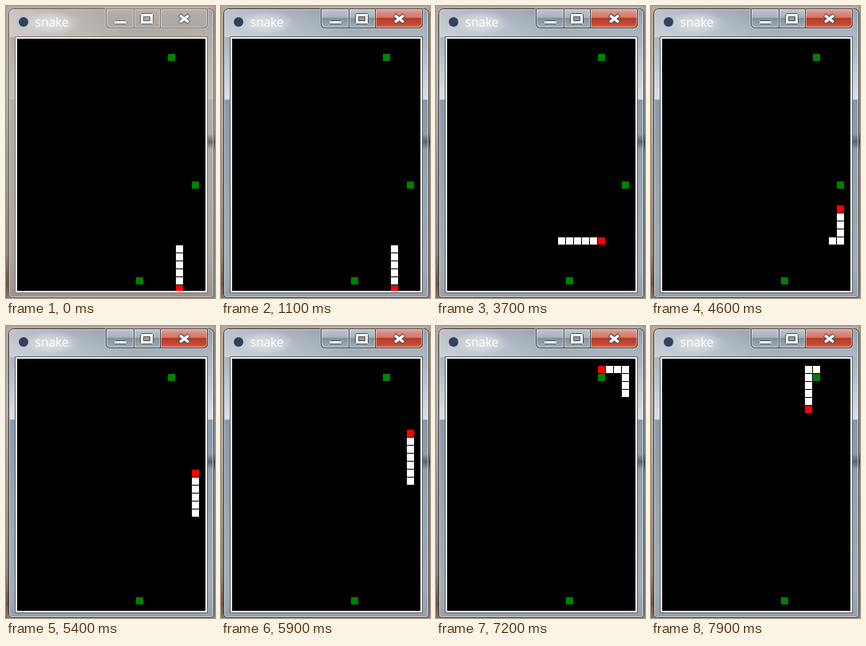
An HTML page with a canvas for the animation above (8000 ms loop, 262 px wide and 366 px high).

```html
<!DOCTYPE html>
<html lang="en">
<head>
<meta charset="utf-8">
<title>snake</title>
<style>
html, body { margin: 0; height: 100%; overflow: hidden; }
canvas { display: block; }
</style>
</head>
<body>
<canvas id="stage" width="262" height="366"></canvas>
<script>
const ctx = document.getElementById('stage').getContext('2d');
const LOOP = 8000, TICK = 100, START = 1900, FOCUS = 1100;
const EATEN = 4900, GROWN = 5600;
const PAUSES = [2300, 3100, 3800, 4400, 5200, 6000, 6600, 7300];
const STEPS = { D: [0, 10], L: [-10, 0], U: [0, -10], R: [10, 0] };

// Every cell the head visits, beginning at the tail of the first pose
const path = [[213, 300]];
for (const [, dir, count] of 'D5 L6 U6 R8 U24 L4 D5'.matchAll(/([DLUR])(\d+)/g)) {
  for (let i = 0; i < count; i++) {
    const [x, y] = path[path.length - 1];
    path.push([x + STEPS[dir][0], y + STEPS[dir][1]]);
  }
}

function rect(color, x, y, w, h) {
  ctx.fillStyle = color;
  ctx.fillRect(x, y, w, h);
}

function outline(color, x, y, w, h, radii = 0) {
  ctx.strokeStyle = color;
  ctx.lineWidth = 1;
  ctx.beginPath();
  ctx.roundRect(x + .5, y + .5, w - 1, h - 1, radii);
  ctx.stroke();
}

function gradient(x0, y0, x1, y1, ...stops) {
  const g = ctx.createLinearGradient(x0, y0, x1, y1);
  for (const [at, color] of stops) g.addColorStop(at, color);
  return g;
}

function drawDesktop() {
  rect(gradient(0, 0, 0, 366, [0, '#b8a79c'], [.3, '#b5aca4'], [.85, '#8d8078'], [.95, '#6d5140'], [1, '#8a7566']), 0, 0, 262, 366);
  rect(gradient(0, 0, 0, 366, [0, '#a99c94'], [.43, '#a8a5a2'], [.465, '#4a4644'], [.5, '#a09d9a'], [1, '#8e8781']), 260, 0, 2, 366);
}

function drawFrame(active) {
  const glass = active
    ? gradient(0, 3, 0, 366, [0, '#8d99a5'], [.07, '#a2adb8'], [.2, '#bfc8d0'], [.314, '#dbe1e6'], [.316, '#8a99a8'], [.6, '#98a5b1'], [.9, '#a3adb5'], [1, '#979fa6'])
    : gradient(0, 3, 0, 366, [0, '#a39e99'], [.1, '#b1aca7'], [.314, '#c4bfbb'], [.316, '#b3aeaa'], [.85, '#aaa5a1'], [1, '#9a938d']);
  ctx.save();
  ctx.beginPath();
  ctx.roundRect(3, 3, 258, 363, [6, 6, 4, 4]);
  ctx.clip();
  rect(glass, 3, 3, 258, 363);
  rect(gradient(3, 0, 261, 0, [0, '#fff6'], [.35, '#fff3'], [.6, '#fff0'], [1, '#fff1']), 3, 3, 258, 36);
  const shade = active ? '#2a3642' : '#3a3330';
  rect(gradient(0, 160, 0, 180, [0, shade + '00'], [.5, shade + '90'], [1, shade + '00']), 253, 160, 8, 20);
  ctx.restore();
  outline(active ? '#343a40' : '#67625e', 3, 3, 258, 363, [6, 6, 4, 4]);
  outline(active ? '#e2e8edb0' : '#e0dcd8a0', 4, 4, 256, 361, [5, 5, 3, 3]);
  outline(active ? '#59636b' : '#7c7773', 11, 38, 242, 322);
  rect('#f0f0f0', 12, 39, 240, 320);
  rect('#000', 14, 41, 236, 316);
}

function drawTitle() {
  const glow = ctx.createRadialGradient(0, 0, 0, 0, 0, 1);
  glow.addColorStop(0, '#ffffff80');
  glow.addColorStop(.55, '#ffffff50');
  glow.addColorStop(1, '#ffffff00');
  ctx.save();
  ctx.translate(57, 21);
  ctx.scale(36, 15);
  rect(glow, -1, -1, 2, 2);
  ctx.restore();
  ctx.fillStyle = '#2f4260';
  ctx.beginPath();
  ctx.arc(22, 20, 6, 0, 7);
  ctx.fill();
  ctx.font = '15.5px "Open Sans", sans-serif';
  ctx.fillStyle = '#fff';
  ctx.fillText('snake', 36.5, 26);
}

function drawButton(x, w, radii, fill, active) {
  ctx.fillStyle = fill;
  ctx.beginPath();
  ctx.roundRect(x, 3, w, 25, radii);
  ctx.fill();
  outline(active ? '#3d444b' : '#75716d', x, 3, w, 25, radii);
  outline('#ffffff70', x + 1, 4, w - 2, 23, radii);
}

function drawButtons(active) {
  const plain = active
    ? gradient(0, 3, 0, 28, [0, '#c0c8cf'], [.45, '#a8b2bb'], [.5, '#83909b'], [1, '#a4b0ba'])
    : gradient(0, 3, 0, 28, [0, '#b5b0ac'], [1, '#aaa5a0']);
  const close = active
    ? gradient(0, 3, 0, 28, [0, '#e0a699'], [.45, '#cf7666'], [.5, '#b83a26'], [.8, '#c24a34'], [1, '#d67a62'])
    : plain;
  outline('#ffffff50', 124, 2, 130, 27, [0, 0, 6, 6]);
  drawButton(125, 36, [0, 0, 0, 5], plain, active);
  drawButton(160, 34, 0, plain, active);
  drawButton(193, 60, [0, 0, 5, 0], close, active);

  const ink = active ? '#4a5058' : '#65666c';
  rect('#fff', 135, 18, 17, 5);
  outline(ink, 135, 18, 17, 5, 1);
  rect('#fff', 168, 9, 17, 14);
  outline(ink, 168, 9, 17, 14, 1);
  rect(active ? '#929da7' : '#aaa5a0', 172, 13, 9, 6);
  outline(ink, 172, 13, 9, 6);
  for (const [color, width, dx, dy] of [[ink, 5.5, 6, 4.8], ['#fff', 3.2, 5.4, 4.3]]) {
    ctx.strokeStyle = color;
    ctx.lineWidth = width;
    ctx.beginPath();
    for (const side of [-1, 1]) {
      ctx.moveTo(223.5 - dx * side, 16 - dy);
      ctx.lineTo(223.5 + dx * side, 16 + dy);
    }
    ctx.stroke();
  }
}

function drawGame(time) {
  const ticks = Math.max(0, Math.floor((time - START) / TICK) + 1);
  const head = 5 + ticks - PAUSES.filter(p => p <= time).length;
  const length = time < GROWN ? 6 : 7;
  const food = [[203, 60], [163, 340]];
  if (time < EATEN) food.push([233, 220]);

  ctx.save();
  ctx.beginPath();
  ctx.rect(14, 41, 236, 316);
  ctx.clip();
  for (const [x, y] of food) rect('#008000', x, y, 9, 9);
  for (let i = head - length + 1; i <= head; i++) {
    rect(i === head ? '#f00' : '#fff', ...path[i], 9, 9);
  }
  ctx.restore();
}

function draw(now) {
  const time = now % LOOP;
  const active = time >= FOCUS;
  drawDesktop();
  drawFrame(active);
  drawTitle();
  drawButtons(active);
  drawGame(time);
  requestAnimationFrame(() => draw(performance.now()));
}
draw(0);
</script>
</body>
</html>
```
